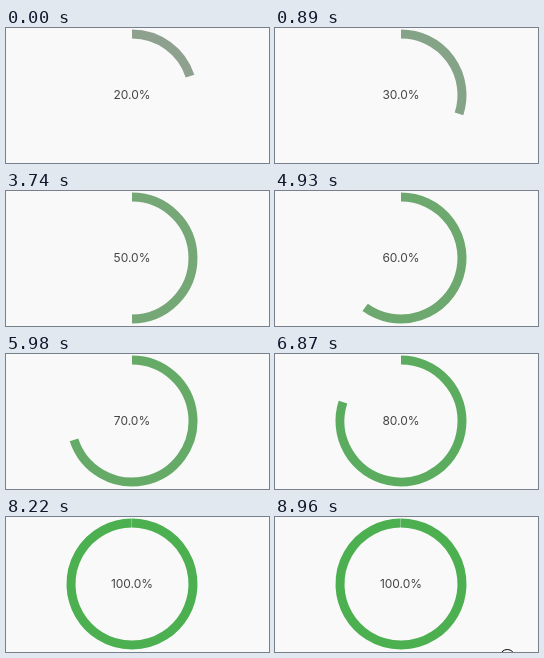
Write an HTML page that moves like this. It is 263x135 px and loops after 9.06 s.

```html
<!DOCTYPE html>
<html lang="en">
<head>
<meta charset="utf-8">
<title>Progress ring</title>
<style>
  html, body { margin: 0; width: 100%; height: 100%; overflow: hidden; background: #f9f9f9; }
  svg { display: block; width: 100%; height: 100%; }
  text { font: 12px Inter, Roboto, sans-serif; fill: #444; text-anchor: middle; }
</style>
</head>
<body>
<svg viewBox="0 0 263 135">
  <path id="ring" fill="none" stroke-width="9"/>
  <text id="label" x="126" y="71.3"></text>
  <path id="arrow" d="M215.7 125.5V138L219 135.2H225Z" stroke="#fff" stroke-width=".8"/>
  <g id="target" fill="none">
    <circle cx="232.3" cy="140" r="7.5" stroke="#fff" stroke-width="2"/>
    <circle cx="232.3" cy="140" r="7.5" stroke="#000"/>
  </g>
</svg>
<script>
const LOOP = 9060;
const steps = [890, 2690, 3740, 4930, 5980, 6870, 7470, 8220];
const center = { x: 126, y: 67 }, radius = 61;
const idle = [158, 158, 158], done = [76, 175, 80];
const $ = id => document.getElementById(id);

function arcPath(part) {
  // A hairline seam stays open at the top of the full ring.
  const angle = Math.min(part * 2 * Math.PI, 2 * Math.PI - 0.005);
  const x = center.x + radius * Math.sin(angle);
  const y = center.y - radius * Math.cos(angle);
  return `M${center.x} ${center.y - radius}A${radius} ${radius} 0 ${+(part > 0.5)} 1 ${x} ${y}`;
}

function show(id, visible) {
  $(id).style.display = visible ? "" : "none";
}

function draw(now) {
  const t = now % LOOP;
  const part = (2 + steps.filter(s => t >= s).length) / 10;
  const color = idle.map((c, i) => Math.round(c + (done[i] - c) * part));
  $("ring").setAttribute("d", arcPath(part));
  $("ring").setAttribute("stroke", `rgb(${color})`);
  $("label").textContent = (part * 100).toFixed(1) + "%";
  show("arrow", t >= 8520 && t < 8660);
  show("target", t >= 8960);
}

const start = performance.now();
function tick() {
  draw(performance.now() - start);
  requestAnimationFrame(tick);
}
tick();
</script>
</body>
</html>
```
